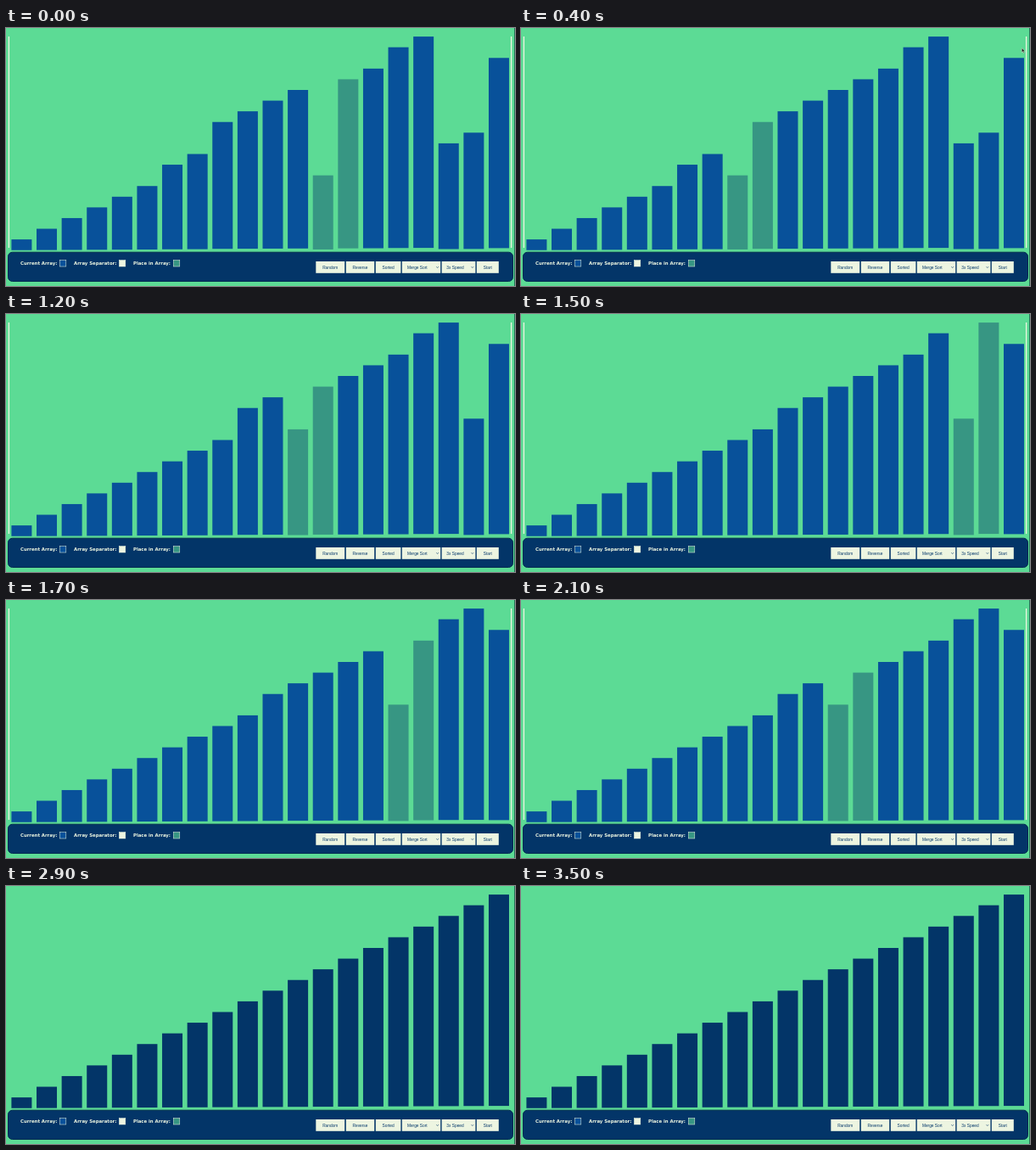
An HTML page that plays this animation: 600 px wide and 304 px high, repeating every 3.6 s.

```html
<!DOCTYPE html>
<html lang="en">
<head>
<meta charset="utf-8">
<title>Merge sort</title>
<style>
  html, body { margin: 0; height: 100%; overflow: hidden; background: #5cdb95; }
  svg { display: block; width: 600px; height: 304px; }
  .label { font: bold 5.35px "DejaVu Sans", sans-serif; fill: #edf5e1; }
  .button { font: 4.8px "Liberation Sans", Arial, sans-serif; fill: #05386b; text-anchor: middle; }
</style>
</head>
<body>
<svg id="stage" viewBox="0 0 600 304">
  <rect width="600" height="304" fill="#5cdb95"/>
  <rect x="599.2" width=".8" height="304" fill="#1d5b4c"/>
  <path id="ends" d="M3.4 10V259M595.6 10V259" stroke="#edf5e1" stroke-width="1.3"/>
  <g id="bars"></g>
  <rect x="2.5" y="264.2" width="595" height="34.3" rx="5" fill="#033568" stroke="#02294f"/>
  <g id="panel"></g>
  <path id="cursor" d="M0 0V5.2L1.3 4.1L2.2 6L3.1 5.6L2.2 3.8H3.8Z" fill="#111" stroke="#edf5e1" stroke-width=".5"/>
</svg>
<script>
const $ = id => document.getElementById(id);
const BLUE = '#08519a', NAVY = '#033568', TEAL = '#379683', CREAM = '#edf5e1';

function add(parent, tag, attrs, text = '') {
  const el = document.createElementNS('http://www.w3.org/2000/svg', tag);
  for (const key in attrs) el.setAttribute(key, attrs[key]);
  el.textContent = text;
  return parent.appendChild(el);
}

// Legend: text, text x, swatch x, colour
for (const [text, x, box, fill] of [
  ['Current Array:', 17, 63.4, BLUE],
  ['Array Separator:', 80, 133.4, CREAM],
  ['Place in Array:', 150, 197.4, TEAL]
]) {
  add($('panel'), 'text', { x, y: 278.8, class: 'label' }, text);
  add($('panel'), 'rect', { x: box, y: 273.6, width: 7.4, height: 7.4, fill, stroke: CREAM, 'stroke-width': .5 });
}

// Controls: text, left, right, text centre, arrow x
for (const [text, left, right, mid, arrow] of [
  ['Random', 365.3, 399.2, 382.2],
  ['Reverse', 400.8, 434.2, 417.5],
  ['Sorted', 435.8, 465.4, 450.6],
  ['Merge Sort', 466.8, 512.2, 484.8, 508.6],
  ['3x Speed', 513.6, 553.4, 529.5, 549.8],
  ['Start', 554.8, 580.8, 567.8]
]) {
  add($('panel'), 'rect', { x: left, y: 275, width: right - left, height: 13.8, fill: CREAM });
  add($('panel'), 'text', { x: mid, y: 283.6, class: 'button' }, text);
  if (arrow) add($('panel'), 'path', { d: `M${arrow - 1.2} 281.3l1.2 1.2l1.2-1.2`, fill: 'none', stroke: NAVY, 'stroke-width': .7 });
}

const bars = Array.from({ length: 20 }, (_, i) =>
  add($('bars'), 'rect', { x: 6.4 + 29.61 * i, width: 24 }));

// Each move carries one value leftwards by neighbour swaps.
const values = [1, 2, 3, 4, 5, 6, 8, 9, 12, 13, 14, 15, 16, 7, 17, 19, 20, 10, 11, 18];
const steps = [];
for (const [from, to] of [[13, 6], [17, 9], [18, 10], [19, 17]]) {
  for (let i = from - 1; i >= to; i--) {
    [values[i], values[i + 1]] = [values[i + 1], values[i]];
    steps.push({ values: [...values], at: i });
  }
}
steps.push({ values: [...values], at: -9 });

function draw() {
  const tick = Math.floor(performance.now() % 3600 / 100);
  const done = tick >= 27;
  // One tick holds still late in the sort.
  const n = Math.min(tick < 20 ? tick : tick - 1, steps.length - 1);
  const { values, at } = steps[n];

  bars.forEach((bar, i) => {
    const top = 261.7 - 12.58 * values[i];
    bar.setAttribute('y', top);
    bar.setAttribute('height', 261.9 - .14 * values[i] - top);
    bar.setAttribute('fill', done ? NAVY : i === at || i === at + 1 ? TEAL : BLUE);
  });
  $('ends').style.display = done ? 'none' : '';

  $('cursor').style.display = tick === 4 || tick === 5 ? '' : 'none';
  $('cursor').setAttribute('transform', tick === 4 ? 'translate(590.3 23.6)' : 'translate(596 3.5)');
  requestAnimationFrame(draw);
}
draw();
</script>
</body>
</html>
```
